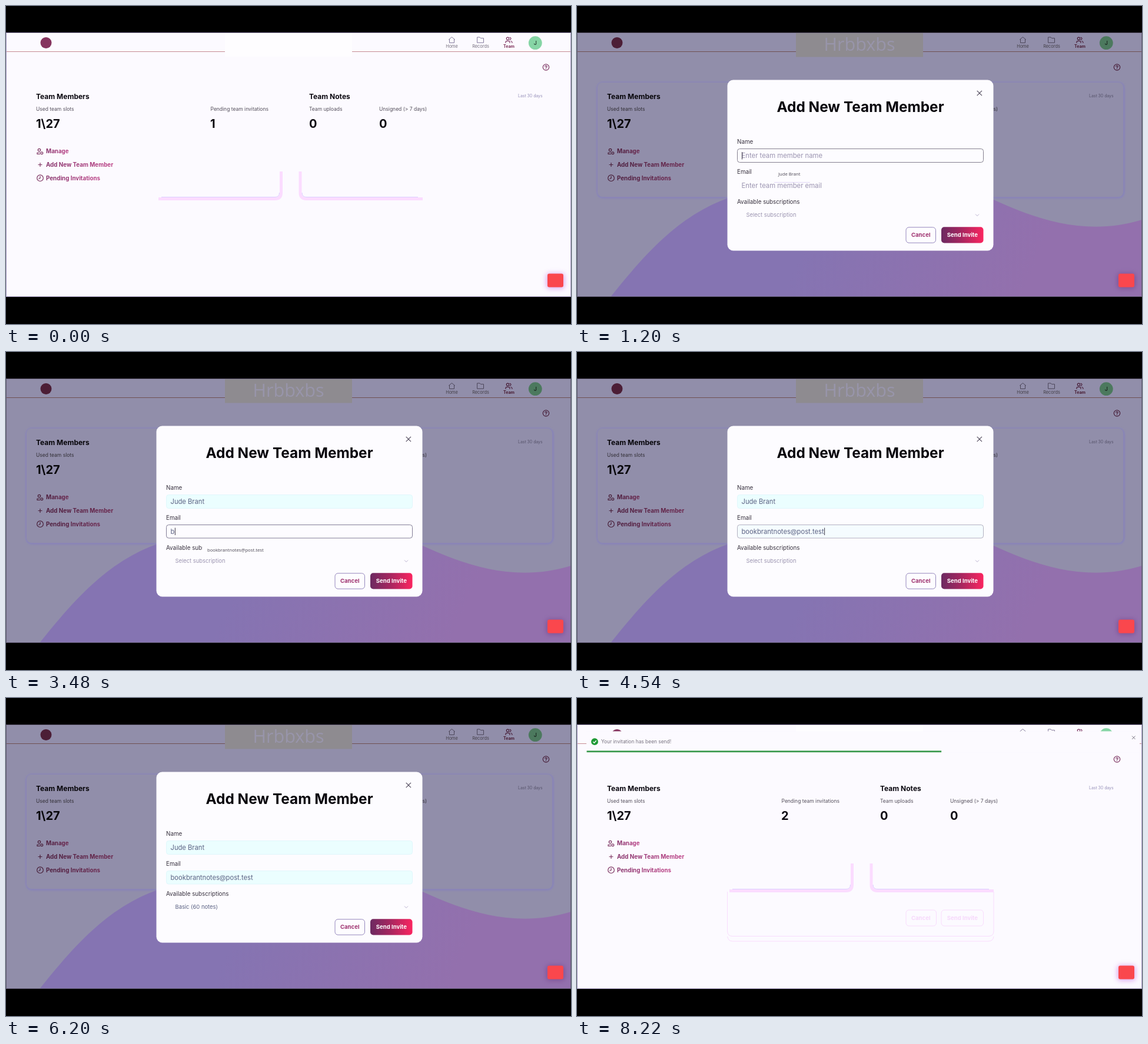
Write an HTML page that moves like this. It is 960 px wide and 540 px high and loops after 8260 ms.

```html
<!DOCTYPE html>
<html lang="en">
<head>
<meta charset="utf-8">
<title>Add a team member</title>
<style>
  html, body { margin: 0; width: 100%; height: 100%; overflow: hidden; background: #000; }
  svg { display: block; width: 100vw; height: 100vh; }
  text { font-family: Inter, Roboto, sans-serif; white-space: pre; }
  .head { font-size: 12px; font-weight: 700; fill: #0b0810; }
  .note { font-size: 8.5px; fill: #55505c; }
  .num { font-size: 20px; font-weight: 700; fill: #0b0810; }
  .link { font-size: 9.8px; font-weight: 700; fill: url(#linkInk); }
  .nav { font-size: 7.4px; fill: #77707f; text-anchor: middle; }
  .icon { fill: none; stroke: #7d3563; stroke-width: 1.2; stroke-linecap: round; stroke-linejoin: round; }
  .soft { stroke: #847a9c; stroke-width: 1; }
  .label { font-size: 9.8px; fill: #38323f; }
  .hint { font-size: 11.3px; fill: #9b94b0; }
  .value { font-size: 11.2px; fill: #5b6283; }
  .pick { font-size: 9.4px; }
  .button { font-size: 9.6px; font-weight: 700; text-anchor: middle; }
  .box { fill: #fdfcff; stroke-width: 1; }
  .filled { fill: #ebfeff; stroke: #d3f3fa; stroke-width: .6; }
  .caret { stroke: #3c3646; stroke-width: 1; }
  .auto text { font-family: "Open Sans", "Noto Sans", sans-serif; font-size: 7.7px; fill: #4a4652; }
  .pop { filter: drop-shadow(0 1px 2px rgba(60, 40, 110, .3)); }
  .ghost { fill: none; stroke: #f9dcfd; stroke-width: 1; }
  .ghost text { fill: #f6d8fb; stroke: none; }
</style>
</head>
<body>
<svg viewBox="0 0 960 540" preserveAspectRatio="none">
  <defs>
    <linearGradient id="linkInk"><stop stop-color="#86336b"/><stop offset="1" stop-color="#bd4388"/></linearGradient>
    <linearGradient id="sendInk"><stop stop-color="#6c2a61"/><stop offset=".45" stop-color="#a3265f"/><stop offset="1" stop-color="#fa2560"/></linearGradient>
    <linearGradient id="wave" gradientUnits="userSpaceOnUse" x1="420" y1="330" x2="760" y2="480">
      <stop stop-color="#8574b2"/><stop offset="1" stop-color="#9370ad"/>
    </linearGradient>
    <filter id="blur" x="-10%" y="-10%" width="120%" height="120%"><feGaussianBlur stdDeviation="1.6"/></filter>
    <filter id="glow" x="-50%" y="-50%" width="200%" height="200%"><feGaussianBlur stdDeviation="4"/></filter>
    <clipPath id="menuClip"><rect x="272" y="367" width="419" height="122.5"/></clipPath>
  </defs>

  <rect x="0" y="45" width="960" height="449" fill="#fcfaff"/>

  <g id="dim">
    <rect x="0" y="45" width="960" height="449" fill="#918eaa"/>
    <path d="M58 493C105 435 165 360 252 328C400 245 560 262 708 329C780 362 865 392 960 363V493Z" fill="url(#wave)"/>
    <g fill="none" stroke="#8580bd" stroke-width="3" filter="url(#blur)">
      <rect x="35" y="130.500" width="431" height="194.500" rx="9"/><rect x="498" y="130.500" width="431" height="194.500" rx="9"/>
    </g>
    <g fill="#918eaa">
      <rect x="35" y="130" width="430" height="194" rx="8"/><rect x="498" y="130" width="430" height="194" rx="8"/>
    </g>
  </g>

  <g id="trace" fill="none" stroke="#fbdcff" stroke-width="5">
    <path d="M259 327.500H457Q467.500 327.500 467.500 317V281M500 281V317Q500 327.500 511 327.500H708"/>
    <path d="M264 324.500H457Q464.500 324.500 464.500 317M503 317Q503 324.500 511 324.500H700" stroke="#dccfff" stroke-width="1"/>
  </g>

  <g id="page">
    <path d="M0 77.500H960" stroke="#c58c92" stroke-width="1.200"/>
    <circle cx="68" cy="62.500" r="9.500" fill="#86345f"/>
    <path class="icon soft" d="M752.500 57L757.500 52.700L762.500 57M753.500 56.300V62.500H761.500V56.300"/>
    <path class="icon soft" d="M801 53H805L806.500 54.700H811.500V62.300H801Z"/>
    <g class="icon">
      <circle cx="852.500" cy="55.300" r="2.200"/>
      <path d="M849 62.500V61Q849 59.300 852.500 59.300T856 61V62.500M856 53.300Q858 54 858 55.300T856 57.500M858 59.500Q860 60 860 62.500"/>
    </g>
    <text class="nav" x="757.500" y="71">Home</text>
    <text class="nav" x="806.500" y="71">Records</text>
    <text class="nav" x="854.500" y="71" style="font-weight:700;fill:#7d2f58;font-size:7.100px">Team</text>
    <circle cx="899.300" cy="62.700" r="11.400" fill="#86d5a5"/>
    <text x="899.300" y="66" text-anchor="middle" font-size="9" font-weight="500" fill="#20352a">J</text>
    <g class="icon"><circle cx="917.500" cy="104" r="5.200"/><path d="M915.900 102.800Q916 101.300 917.500 101.300T919.200 102.800Q919.200 103.700 917.500 104.500V105M917.500 106.700V106.800"/></g>

    <text class="head" x="51" y="157.800">Team Members</text>
    <text class="head" x="515" y="157.800">Team Notes</text>
    <text x="870" y="155" font-size="6.900" fill="#958fb8">Last 30 days</text>
    <text class="note" x="51" y="177.500">Used team slots</text>
    <text class="note" x="347.500" y="177.500">Pending team invitations</text>
    <text class="note" x="515" y="177.500">Team uploads</text>
    <text class="note" x="634" y="177.500">Unsigned (&gt; 7 days)</text>
    <text class="num" x="51" y="207.300">1\27</text>
    <text class="num" id="pending" x="347" y="207.300">1</text>
    <text class="num" x="515" y="207.300">0</text>
    <text class="num" x="634" y="207.300">0</text>

    <g class="icon">
      <circle cx="56.500" cy="244.500" r="2.200"/><path d="M57.500 249H53V251.500H57.500"/>
      <circle cx="60.800" cy="249.700" r="1.900"/>
      <path d="M58 266.500V272.500M55 269.500H61"/>
      <circle cx="58" cy="292.200" r="5.300"/><path d="M58 289V292.500L55.800 293.500"/>
    </g>
    <text class="link" x="68" y="250.200">Manage</text>
    <text class="link" x="68" y="272.800">Add New Team Member</text>
    <text class="link" x="68" y="295.500">Pending Invitations</text>
  </g>

  <rect x="372" y="45" width="216" height="41" fill="#fefdff"/>
  <g id="banner">
    <rect x="372" y="45" width="216" height="41.500" fill="#8e8b90"/>
    <text x="480" y="76" text-anchor="middle" font-size="30.500" fill="#9895aa" style="font-family:'Open Sans','Noto Sans',sans-serif">Hrbbxbs</text>
  </g>

  <g id="ghost" class="ghost">
    <path d="M255.500 329V396Q256 404.500 264 404.500H699Q708 404.500 708 396V329M255.500 405Q257 413 264 413H699Q707 413 708 405"/>
    <g id="ghostButtons">
      <rect x="559" y="360" width="51.500" height="27" rx="5"/><rect x="619" y="360" width="71.500" height="27" rx="5"/>
      <text class="button" x="584.200" y="376.500">Cancel</text>
      <text class="button" x="654.800" y="376.500">Send Invite</text>
    </g>
  </g>

  <g id="chatGlow"><rect x="918" y="454" width="31" height="26" rx="5" fill="#c05ce0" opacity=".5" filter="url(#glow)"/></g>
  <rect x="920" y="454.500" width="27" height="23" rx="3" fill="#fa474d"/>

  <g id="modal">
    <rect x="255.500" y="125.500" width="452" height="290" rx="10" fill="#fdfcff"/>
    <path d="M679.700 143.800L688 152.200M688 143.800L679.700 152.200" stroke="#4c4558" stroke-width="1.100"/>
    <text x="481.500" y="179.500" text-anchor="middle" font-size="24.400" font-weight="700" fill="#08060c">Add New Team Member</text>

    <text class="label" x="272" y="234.300">Name</text>
    <rect id="nameBox" x="272.500" y="242.500" width="418" height="23" rx="4"/>
    <text id="nameText" x="279.500" y="258.200"></text>
    <path id="nameCaret" class="caret" d="M280.500 248V260.500"/>

    <text class="label" x="272" y="285.200">Email</text>
    <rect id="mailBox" x="272.500" y="293.500" width="418" height="22.500" rx="4"/>
    <text id="mailText" x="279.500" y="308.500"></text>
    <path id="mailCaret" class="caret" d="M0 298.500V311"/>

    <text class="label" x="272" y="335.500">Available subscriptions</text>
    <rect id="planBox" x="272.500" y="343.500" width="418" height="22.500" rx="4"/>
    <text id="planText" class="pick" x="287.500" y="358.400"></text>
    <path id="planCaret" class="caret" d="M288.500 348.500V361"/>
    <path id="chevron" d="M677 353.500L680 356.500L683 353.500" fill="none"/>

    <rect x="559" y="375.800" width="50.500" height="26.400" rx="5" fill="#fdfcff" stroke="#9487bd"/>
    <text class="button" x="584.200" y="391.500" fill="#9f3370">Cancel</text>
    <rect x="619" y="375.300" width="71.500" height="27.200" rx="5" fill="url(#sendInk)"/>
    <text class="button" x="654.800" y="391.500" fill="#fff">Send Invite</text>

    <g id="nameList" class="auto">
      <rect x="334.500" y="273" width="62.500" height="26.500" fill="#fdfcff"/>
      <path d="M335 299.500H396" stroke="#e0d6f4"/>
      <text x="342" y="288">Jude Brant</text>
    </g>
    <g id="mailList" class="auto"></g>
    <g id="menu">
      <rect class="pop" x="272.500" y="367" width="418" height="122.500" fill="#fdfcff"/>
      <g id="options" clip-path="url(#menuClip)"></g>
      <rect x="687" y="371.500" width="3.200" height="26" rx="1" fill="#5a1f49"/>
    </g>
  </g>

  <g id="toast">
    <rect x="16" y="56.500" width="940" height="36" fill="#fcfaff"/>
    <circle cx="30" cy="74.200" r="5.900" fill="#1f9a35"/>
    <path d="M27.300 74.300L29.300 76.200L32.800 72.300" fill="none" stroke="#fff" stroke-width="1.300"/>
    <text x="41" y="77" font-size="8.400" fill="#77727e">Your invitation has been send!</text>
    <path d="M943 64.500L948.500 70M948.500 64.500L943 70" stroke="#7b7684"/>
    <rect id="bar" x="16.500" y="89.500" height="2.700" fill="#37984a"/>
  </g>

  <rect id="edge" x=".5" y="45.500" width="959" height="448" fill="none" stroke="#a99cc6" stroke-width="1"/>
  <path d="M0 0H960V45H0ZM0 494H960V540H0Z"/>
</svg>

<script>
const LOOP = 8260;
const AT = {
  open: 520, nameList: 1000, nameSet: 1500,
  mailFocus: 1950, mailList: 2100, type: 3150, mailSet: 4350,
  planFocus: 4960, menu: 5040, planSet: 6000,
  undim: 6700, close: 6780, toast: 7348
};
const PERSON = "Jude Brant";
const MAILS = ["brantnotes@post.test", "judebran284@post.test", "jude@mail.test",
  "petra@offices.test", "bookbrantnotes@post.test"];
const MAIL = MAILS[4];
const PLAN = "Basic (60 notes)";

const el = {};
document.querySelectorAll("[id]").forEach(n => el[n.id] = n);
const show = (id, on) => { el[id].style.display = on ? "" : "none"; };
const ramp = (t, from, span) => Math.min(1, Math.max(0, (t - from) / span));
const within = (t, from, to) => t >= from && t < to;

function mailRows(list) {
  const h = list.length > 1 ? 116 : 26;
  return `<rect x="334" y="324" width="122" height="${h}" rx="2" fill="#fdfcff"/>` +
    list.map((m, i) => `<text x="342" y="${338.6 + i * 22.6}">${m}</text>`).join("");
}

el.options.innerHTML = Array.from({ length: 6 }, (_, i) =>
  `<text class="pick" x="280" y="${386.5 + i * 20.4}" fill="#77718a">${PLAN}</text>`).join("");

function field(name, text, hint, focused, filled, ink) {
  const box = el[name + "Box"], label = el[name + "Text"];
  box.setAttribute("class", filled ? "filled" : "box");
  box.style.stroke = focused ? ink : filled ? "" : "#fdfcff";
  label.textContent = text || hint;
  label.setAttribute("class", (text ? "value" : "hint") + (name === "plan" ? " pick" : ""));
  show(name + "Caret", focused);
}

let rowCount = 0;
function draw(t) {
  const fadeIn = ramp(t, AT.open, 180), fadeOut = ramp(t, AT.close, 180);
  const dim = fadeIn * (1 - ramp(t, AT.undim, 160));
  el.dim.style.opacity = el.banner.style.opacity = dim;
  const shade = dim > 0 ? `brightness(${1 - 0.43 * dim})` : "none";
  for (const id of ["page", "chatGlow", "edge"]) el[id].style.filter = shade;

  const shown = fadeIn * (1 - fadeOut);
  show("modal", shown > 0);
  el.modal.style.opacity = shown;
  el.modal.setAttribute("transform", `translate(0 ${-21.6 * (1 - fadeIn + fadeOut)})`);
  show("trace", t < AT.open || t >= AT.close + 180);
  show("ghost", t >= AT.close + 60);
  show("ghostButtons", t >= AT.close + 180);

  const named = t >= AT.nameSet, mailed = t >= AT.mailSet;
  field("name", named ? PERSON : "", "Enter team member name",
    within(t, AT.open + 180, AT.mailFocus), named, "#85808f");
  const nameEnd = named ? el.nameText.getComputedTextLength() + .5 : 0;
  el.nameCaret.setAttribute("transform", `translate(${nameEnd} 0)`);
  show("nameList", within(t, AT.nameList, AT.nameSet));

  const typed = Math.floor(ramp(t, AT.type, 700) * 4);
  const mail = mailed ? MAIL : MAIL.slice(0, typed);
  field("mail", mail, "Enter team member email",
    within(t, AT.mailFocus, AT.planFocus), mailed, "#837e97");
  el.mailBox.style.fill = mailed && t < AT.planFocus ? "#f5fcff" : "";
  const mailEnd = mail ? el.mailText.getComputedTextLength() + 1 : 1;
  el.mailCaret.setAttribute("transform", `translate(${279.5 + mailEnd} 0)`);
  const rows = typed ? 1 : MAILS.length;
  if (rows !== rowCount) el.mailList.innerHTML = mailRows(rows === 1 ? [MAIL] : MAILS);
  rowCount = rows;
  show("mailList", within(t, AT.mailList, AT.mailSet));

  const choosing = within(t, AT.planFocus, AT.planSet);
  field("plan", t >= AT.planSet ? PLAN : "", "Select subscription", choosing, false, "#9a82bd");
  el.chevron.setAttribute("stroke", choosing ? "#4b4358" : "#b9b0cf");
  show("menu", within(t, AT.menu, AT.planSet));

  show("toast", t >= AT.toast);
  const drop = 1 - ramp(t, AT.toast, 160);
  el.toast.setAttribute("transform", `translate(0 ${-48 * drop ** 3})`);
  el.bar.setAttribute("width", 926 * (1 - ramp(t, AT.toast, 2500)));
  el.pending.textContent = t >= AT.toast ? "2" : "1";
}

function tick() {
  draw(performance.now() % LOOP);
  requestAnimationFrame(tick);
}
tick();
</script>
</body>
</html>
```
